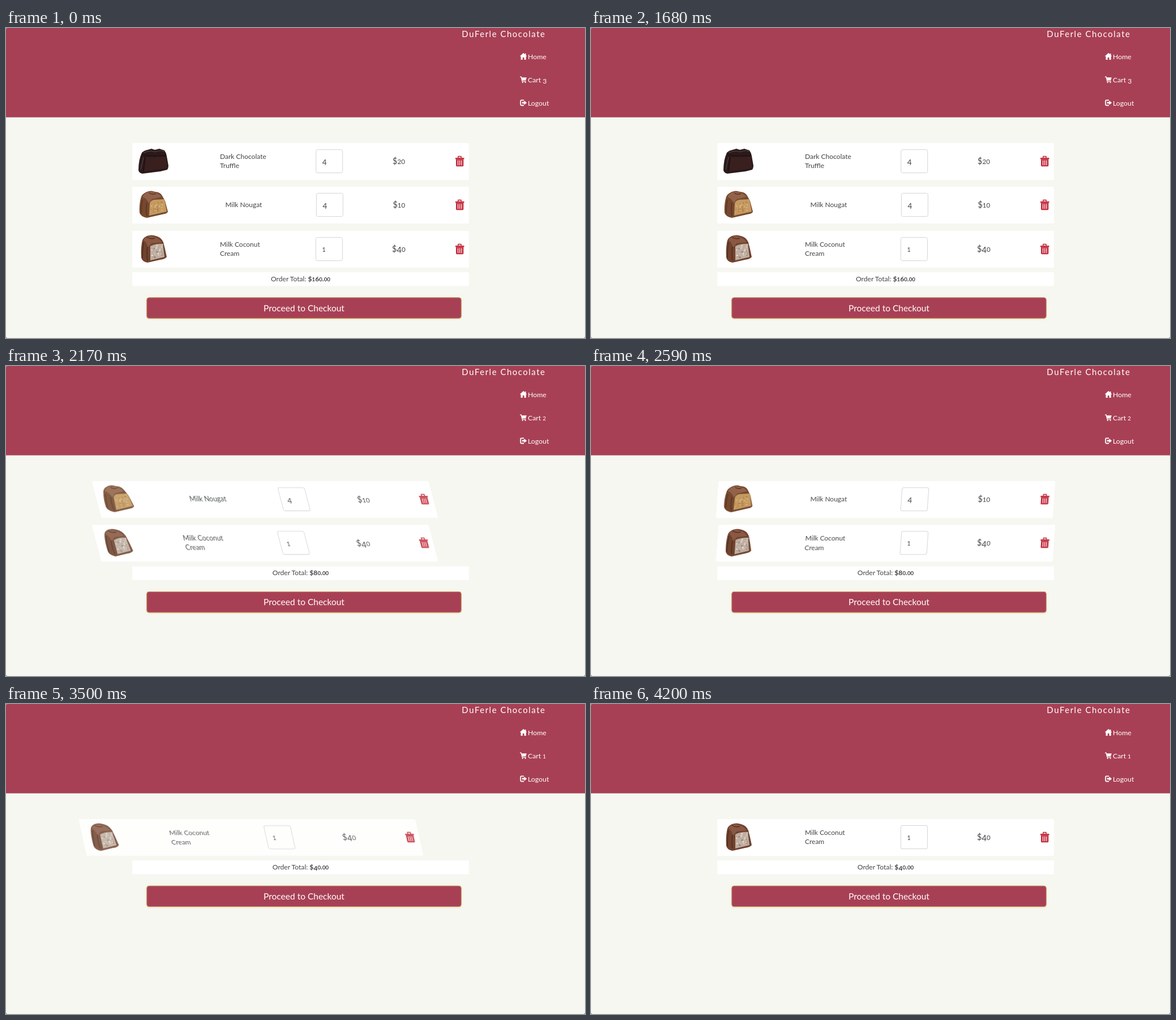
These frames come from a looping animation (1023 by 547 pixels, 4620 ms). An HTML page:

```html
<!DOCTYPE html>
<html lang="en">
<head>
<meta charset="utf-8">
<title>Shopping cart</title>
<style>
  html, body { margin: 0; width: 100%; height: 100%; overflow: hidden; background: #85868a; }
  #stage {
    position: absolute; left: 0; top: 0; width: 1023px; height: 547px;
    overflow: hidden; background: #f5f7f0; border-radius: 3px 0 3px 3px;
    font: 12px Lato, "Open Sans", sans-serif;
  }
  svg { display: block; position: absolute; left: 0; top: 0; overflow: visible; }
  text { fill: #414345; }
  .nav, .nav text, .button text { fill: #fff; }
  .nav text { font-size: 12.3px; }
  .nav .brand { font-size: 15px; letter-spacing: 1.5px; text-anchor: end; }
  .button text { font-size: 15.5px; }
  .button rect {
    fill: #a84055; stroke: #c9965a;
    filter: drop-shadow(0 1px 1px #ebe1c0);
  }
  .mid { text-anchor: middle; }
  .total { font-size: 12.1px; }
  .quantity { font-size: 13.5px; }
  .price { font-size: 14.5px; }
  .small { font-size: .8em; }
  .drop { baseline-shift: -.17em; }
  .row {
    position: absolute; left: 223px; width: 595px; height: 65px;
    background: #fff; border-radius: 2px;
  }
  .field { fill: #fff; stroke: #d3d5d6; }
  .trash { fill: #c43343; }
</style>
</head>
<body>
<div id="stage">
  <svg width="1023" height="547">
    <rect width="1023" height="157.6" fill="#a84055"/>
    <g class="nav">
      <text class="brand" x="953.5" y="16">DuFerle Chocolate</text>
      <path d="M914.2 44l6.4 6h-1.8v6h-3.2v-4h-2.8v4h-3.2v-6h-1.8zM916.8 45h1.8v3h-1.8z"/>
      <text x="922" y="55">Home</text>
      <path d="M908 85.5h2.7l.6 1.7h8.6l-1.6 5h-5.9l.3 1.1h6.1v1.1h-7.2l-2-7.6H908z"/>
      <circle cx="912.8" cy="95.9" r="1.1"/><circle cx="917.6" cy="95.9" r="1.1"/>
      <text id="cart" x="922" y="95.7"></text>
      <path d="M915 127.3h-4.3q-1.5 0-1.5 1.5v6.2q0 1.5 1.5 1.5h4.3" fill="none" stroke="#fff" stroke-width="1.8"/>
      <path d="M911.8 130.6h3.7v-2.6l4.7 3.9-4.7 3.9v-2.6h-3.7z"/>
      <text x="922" y="136.6">Logout</text>
    </g>
    <g id="footer">
      <rect x="223" y="430.8" width="595" height="24.4" rx="1" fill="#fff"/>
      <text id="total" class="mid total" x="520.5" y="446.8"></text>
      <g class="button">
        <rect x="248.7" y="475.7" width="555.6" height="36.6" rx="4"/>
        <text class="mid" x="526.5" y="499.6">Proceed to Checkout</text>
      </g>
    </g>
  </svg>
</div>

<script>
const LOOP = 4620, TICK = 70, PITCH = 77.35, ENTRY = 1100;
const $ = id => document.getElementById(id);

// Old-style figures: short 0-2, descending 3-5, 7 and 9.
const figures = s => s.replace(/[0-2]|[34579]/g, d =>
  `<tspan class="${d < 3 ? 'small' : 'drop'}">${d}</tspan>`);

let seed = 7;
const random = () => (seed = seed * 16807 % 2147483647) / 2147483647;

// Specks scattered over a slightly slanted cut face.
function specks(x, y, w, h, colors) {
  let out = '';
  for (let i = 0; i < 36; i++) {
    const u = random();
    const cx = x + u * w, cy = y + random() * h - u * 4;
    out += `<circle cx="${cx.toFixed(1)}" cy="${cy.toFixed(1)}" r="${(.6 + random()).toFixed(1)}" fill="${colors[i % colors.length]}"/>`;
  }
  return out;
}

const dark = `
  <path fill="#2b1a1b" d="M240 17q4-4 10-5l7-2 6 2 8-2 9 3q3 4 4 10l3 17q0 4-2 7l-12 3-32 4q-6-1-7-6q0-18 6-31z"/>
  <path fill="#3a1f1f" d="M247 25l36-1 2 20-41 6z"/>
  <path fill="none" stroke="#5a4848" d="M243 17q7-3 14-3q6 3 12 0q6-2 11 1M243 25l-5 22"/>
  <path fill="none" stroke="#1d1012" stroke-width="1.5" d="M241 21q18 3 42 1M246 25q-2 12-3 25"/>`;

const nougat = `
  <path fill="#75482f" d="M238 21q1-8 11-12q7-3 14 0q9 0 13 7l5 9 5 19q-1 3-6 4l-31 7q-11-2-13-9q-1-13 2-25z"/>
  <path fill="#92634a" d="M241 18q4-8 13-9q14 0 21 9l-17 4-6 7q-3-8-11-11z"/>
  <path fill="none" stroke="#58351f" stroke-width="1.5" d="M253 11q5 4 12 1M241 23q-2 12-2 24M249 28q-2 12 0 24"/>
  <path fill="#c59a60" d="M254 29q2-5 8-6l18-1 4 22-31 7z"/>
  ${specks(256, 29, 22, 18, ['#d8b27c', '#b08049'])}`;

const coconut = `
  <path fill="#70432f" d="M240 21q1-9 9-12q8-3 16 0q9 2 13 11l3 12 3 14q-3 4-12 5l-22 5q-10-2-11-9q-1-14 1-26z"/>
  <path fill="#8a5944" d="M243 16q5-7 13-7q13 2 19 11l-18 2-6 7q-2-8-8-13z"/>
  <path fill="none" stroke="#4f2d1f" stroke-width="1.5" d="M249 11q6 4 14 2M243 20q-2 13-2 28M250 28q-2 11 0 24"/>
  <path fill="#bfaea1" d="M255 27q11-5 22-4l3 23-25 6z"/>
  ${specks(257, 28, 20, 20, ['#e3dad1', '#98806f', '#d3c6bb'])}`;

const trash = `<g class="trash">
  <path d="M794 26h4v-2q0-1.2 1.2-1.2h4.6q1.2 0 1.2 1.2v2h4.5v2.4H794zM799.6 26h3.8v-1.6h-3.8z" fill-rule="evenodd"/>
  <path d="M795 28.2h13.4v11.4q0 1.6-1.6 1.6h-10.2q-1.6 0-1.6-1.6z"/>
  <path d="M798.6 30.5v8.5M801.7 30.5v8.5M804.8 30.5v8.5" stroke="#fff" stroke-width="1.1"/></g>`;

const editor = `<g id="editor">
  <path id="caret" d="M566.5 24.5v15.5" stroke="#222"/>
  <rect x="572" y="23" width="12" height="18.5" fill="#f0f0f0"/>
  <path d="M575 30l3-3.2 3 3.2zM575 35.5l3 3.2 3-3.2z" fill="#444"/></g>`;

function makeRow([thumb, lines, x, qty, price, shift, extra = '']) {
  const row = document.createElement('div');
  const firstLine = lines.length > 1 ? 28 : 36;
  row.className = 'row';
  row.innerHTML = `<svg width="595" height="65" viewBox="223 0 595 65">${thumb}
    ${lines.map((s, i) => `<text x="${x}" y="${firstLine + i * 16.4}">${s}</text>`).join('')}
    <rect class="field" x="${547.7 + shift}" y="11.6" width="47" height="41" rx="3"/>
    <text class="quantity" x="${558.7 + shift}" y="37.3">${figures(qty)}</text>
    <text class="price mid" x="${694 + shift / 2}" y="37.3">${figures(price)}</text>
    ${trash}${extra}</svg>`;
  $('stage').append(row);
  return row;
}

const rows = [
  [dark, ['Dark Chocolate', 'Truffle'], 378, '4', '$20', 0],
  [nougat, ['Milk Nougat'], 387.5, '4', '$10', .7, editor],
  [coconut, ['Milk Coconut', 'Cream'], 378, '1', '$40', -.3]
].map(makeRow);

const entries = rows.map(row => {
  const entry = row.animate([
    { transform: 'translateX(-100%) skewX(-30deg)', opacity: 0, easing: 'ease' },
    { transform: 'translateX(0%) skewX(20deg)', opacity: 1, offset: .6, easing: 'ease' },
    { transform: 'translateX(0%) skewX(-5deg)', opacity: 1, offset: .8, easing: 'ease' },
    { transform: 'translateX(0%) skewX(0deg)', opacity: 1 }
  ], { duration: ENTRY, fill: 'both' });
  entry.pause();
  return entry;
});

const totals = ['$160.00', '$80.00', '$40.00'];
const entryStart = [-ENTRY, 1765, 3133];
let shown = -1;

function showCart(removed) {
  shown = removed;
  $('cart').innerHTML = 'Cart ' + figures(String(3 - removed));
  $('total').innerHTML = `Order Total: <tspan font-weight="700">${figures(totals[removed])}</tspan>`;
  $('footer').setAttribute('transform', `translate(0 ${-PITCH * removed})`);
  rows.forEach((row, i) => {
    row.style.display = i < removed ? 'none' : '';
    row.style.top = 203 + PITCH * (i - removed) + 'px';
  });
}

const start = performance.now();

function draw() {
  const time = Math.floor((performance.now() - start) % LOOP / TICK) * TICK;
  const removed = time < 1820 ? 0 : time < 3150 ? 1 : 2;
  if (removed !== shown) showCart(removed);
  const elapsed = Math.min(time - entryStart[removed], ENTRY);
  entries.forEach(entry => { entry.currentTime = elapsed; });
  $('editor').style.display = time >= 840 && time < 1680 ? '' : 'none';
  $('caret').style.display = time < 1400 ? '' : 'none';
  requestAnimationFrame(draw);
}
draw();
</script>
</body>
</html>
```
